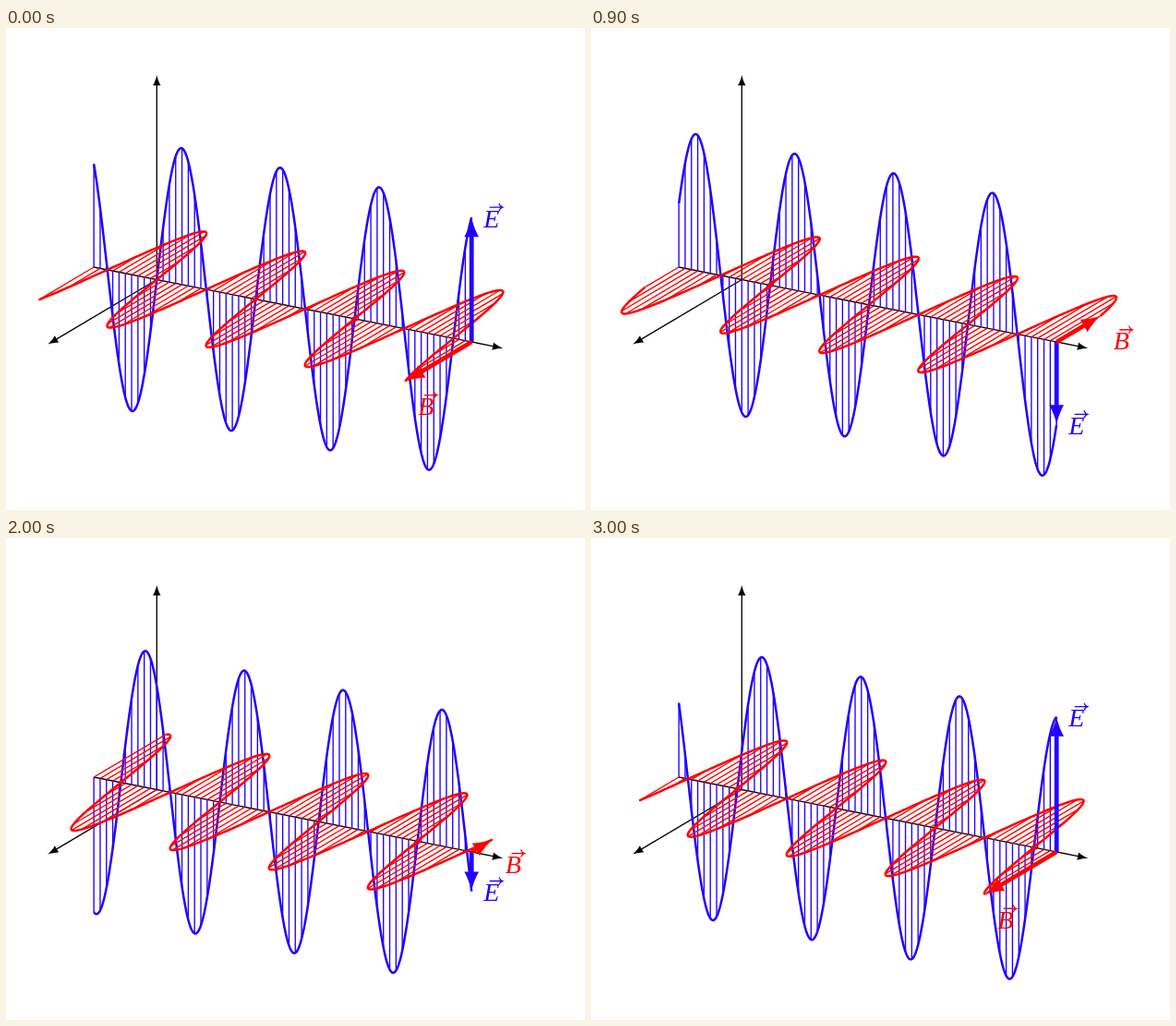
Recreate the animation shown at these times as an HTML page. Size 627 px wide and 522 px high, loop 3.1 s.

```html
<!DOCTYPE html>
<html lang="en">
<head>
<meta charset="utf-8">
<title>Electromagnetic wave</title>
<style>
  html, body { margin: 0; width: 100%; height: 100%; overflow: hidden; background: #fff; }
  svg { display: block; }
  text { font: italic 28px "Liberation Serif", "Times New Roman", serif; }
  .axis { color: #000; }
  .e { color: #2200ff; }
  .b { color: #f00; }
  path { fill: none; stroke: currentColor; }
  .head { fill: currentColor; stroke: none; }
  text { fill: currentColor; }
  .hatch, .line { stroke-width: 1.35; }
  .curve { stroke-width: 2.5; stroke-linejoin: round; }
  .shaft { stroke-width: 4.8; }
  .bar { stroke-width: 1.3; stroke-linecap: round; }
</style>
</head>
<body>
<svg id="stage" width="627" height="522" viewBox="0 0 627 522"></svg>
<script>
const STEP_MS = 100, STEPS = 31, PHASE_STEP = 0.2;
const ORIGIN = [163.3, 272.5];
const UNIT = [68.17, 13.5];          // one unit along the direction of travel
const E_DIR = [0, -147.7];
const B_DIR = [-78.7, 46.7];
const START = -1, END = 5;

const stage = document.getElementById('stage');

function add(parent, tag, attrs = {}) {
  const el = document.createElementNS('http://www.w3.org/2000/svg', tag);
  for (const key in attrs) el.setAttribute(key, attrs[key]);
  return parent.appendChild(el);
}

const along = (p, dir, k) => [p[0] + dir[0] * k, p[1] + dir[1] * k];
const onAxis = s => along(ORIGIN, UNIT, s);
const pt = p => p[0].toFixed(2) + ' ' + p[1].toFixed(2);
const segment = (a, b) => `M${pt(a)}L${pt(b)}`;
const wave = (s, phase) => Math.sin(4 * s - phase);

// Arrow with a slightly hollow-sided head; u is a tenth of the head length
function makeArrow(parent, lineClass, u) {
  const shaft = add(parent, 'path', { class: lineClass });
  const head = add(parent, 'path', {
    class: 'head',
    d: 'M0 0C-2.67 .5 -7 2 -10 3.75L-10 -3.75C-7 -2 -2.67 -.5 0 0Z'
  });
  return (from, tip, dir) => {
    const len = Math.hypot(...dir);
    const base = along(tip, dir, -9.8 * u / len);
    const angle = Math.atan2(dir[1], dir[0]) * 180 / Math.PI;
    shaft.setAttribute('d', segment(from, base));
    head.setAttribute('transform', `translate(${pt(tip)}) rotate(${angle}) scale(${u})`);
  };
}

function makeLabel(parent, letter, dx, dy) {
  const g = add(parent, 'g');
  add(g, 'text', { x: dx, y: dy }).textContent = letter;
  const x = dx + 20.5, y = dy - 21.5;
  add(g, 'path', {
    class: 'bar',
    d: `M${x - 13.5} ${y}H${x}M${x - 3.5} ${y - 3.6}Q${x - 2.6} ${y - 0.8} ${x} ${y}Q${x - 2.6} ${y + 0.8} ${x - 3.5} ${y + 3.6}`
  });
  return tip => g.setAttribute('transform', `translate(${pt(tip)})`);
}

function makeField(cls, dir) {
  const g = add(stage, 'g', { class: cls });
  const hatch = add(g, 'path', { class: 'hatch' });
  const curve = add(g, 'path', { class: 'curve' });
  const at = (s, phase) => along(onAxis(s), dir, wave(s, phase));
  return phase => {
    let lines = '', points = [];
    for (let i = 0; i <= 60; i++) {
      const s = START + i / 10;
      lines += segment(onAxis(s), at(s, phase));
    }
    for (let i = 0; i <= 480; i++) points.push(pt(at(START + i / 80, phase)));
    hatch.setAttribute('d', lines);
    curve.setAttribute('d', 'M' + points.join('L'));
  };
}

function makeVector(cls, dir, letter, dx, dy) {
  const g = add(stage, 'g', { class: cls });
  const arrow = makeArrow(g, 'shaft', 2.1);
  const label = makeLabel(g, letter, dx, dy);
  return phase => {
    const value = wave(END, phase), from = onAxis(END);
    const tip = along(from, dir, value);
    arrow(from, tip, dir.map(v => v * Math.sign(value)));
    label(tip);
  };
}

const axes = add(stage, 'g', { class: 'axis' });
for (const [from, dir, k] of [[START, UNIT, 5.5], [0, E_DIR, 1.5], [0, B_DIR, 1.5]])
  makeArrow(axes, 'line', 1.13)(onAxis(from), along(ORIGIN, dir, k), dir);

const parts = [
  makeField('e', E_DIR),
  makeField('b', B_DIR),
  makeVector('e', E_DIR, 'E', 13, 10.5),
  makeVector('b', B_DIR, 'B', 14, 36.5)
];

let shown = -1;
function tick() {
  const step = Math.floor(performance.now() / STEP_MS) % STEPS;
  if (step !== shown) {
    shown = step;
    parts.forEach(draw => draw(step * PHASE_STEP));
  }
  requestAnimationFrame(tick);
}
tick();
</script>
</body>
</html>
```
